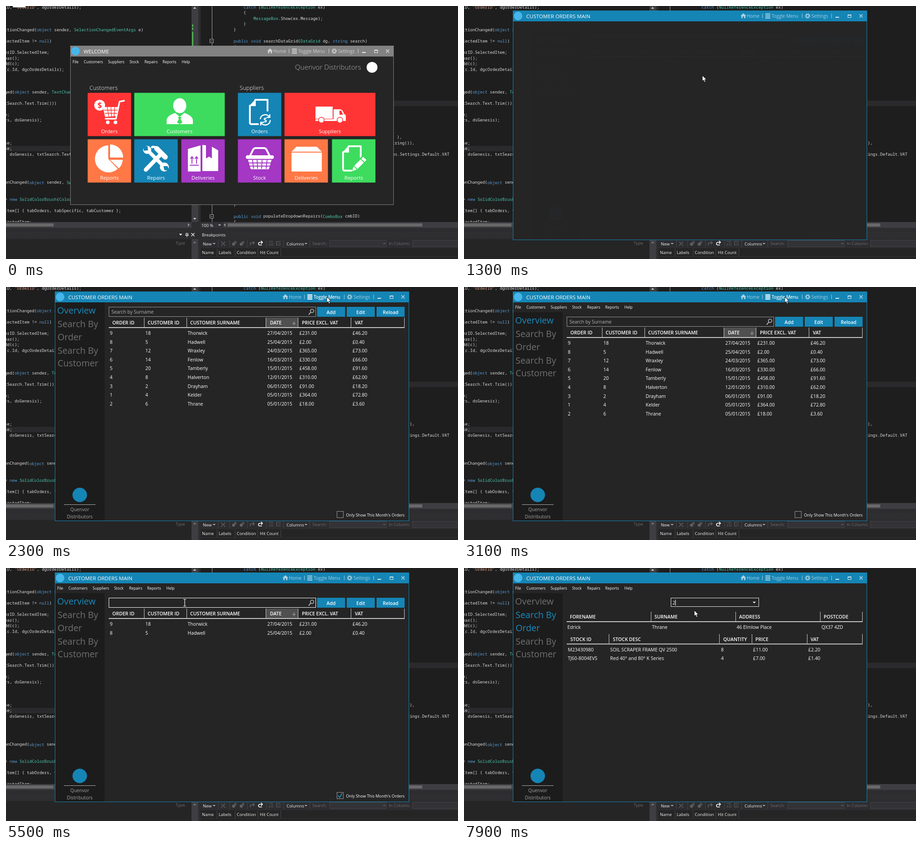
Recreate the animation shown at these times as an HTML page. Size 999 px wide and 561 px high, loop 8000 ms.

```html
<!DOCTYPE html>
<html lang="en">
<head>
<meta charset="utf-8">
<title>Customer orders</title>
<style>
html,body{margin:0;width:100%;height:100%;overflow:hidden;background:#1e1e1e}
svg{display:block;width:999px;height:561px}
text{font-family:"Open Sans","Noto Sans",sans-serif;font-size:10.4px;fill:#fff;dominant-baseline:central;white-space:pre}
.code{font-family:"Noto Sans Mono","DejaVu Sans Mono",monospace;font-size:9.13px;fill:#dcdcdc}
.kw{fill:#569cd6}.ty{fill:#4ec9b0}.st{fill:#d69d85}
.vs{font-size:9.4px;fill:#f1f1f1}
.off{fill:#6d6d70}
.menu{font-size:8.4px}
.title{font-size:11.6px}
.cmd{font-size:9.9px}
.tile{font-size:11.3px;text-anchor:middle}
.group{font-size:12.8px;font-weight:300}
.brand{font-size:15.4px;font-weight:300;fill:#b4b4b4;text-anchor:end}
.tab{font-size:19.7px;fill:#707070}
.tab.on{fill:#1a8bbd}.tab.hot{fill:#b8b8b8}
.head{font-size:10.5px;font-weight:600}
.btn{font-weight:600;text-anchor:middle}
.side{font-size:10.3px;fill:#a5a5a5;text-anchor:middle}
.hint{fill:#b4b4b4}
.note{font-size:8.9px;text-anchor:end}
.dim{fill:#949494}
.ln{fill:none;stroke:#fff;stroke-linecap:round;stroke-linejoin:round}
.step{animation-duration:8s;animation-iteration-count:infinite;animation-timing-function:step-end}
#active{animation-name:activate}
#slide{animation:slide 8s infinite linear}
#body{animation-name:lift}
#hover{animation-name:hover}
#cursor{animation:move 8s infinite linear}
@keyframes activate{0%{fill:#828282;stroke:#828282}11.25%,100%{fill:#1585b5;stroke:#1585b5}}
@keyframes slide{
  0%,16.25%{transform:translateX(40px);opacity:0;animation-timing-function:cubic-bezier(.165,.84,.44,1)}
  20%{opacity:1}
  22.5%,100%{transform:none;opacity:1}
}
@keyframes lift{
  0%,31.25%,38.75%,100%{transform:none}
  27.5%,35%{transform:translateY(-22px)}
}
@keyframes hover{
  0%,48.75%,58.75%,100%{opacity:0}
  45%{opacity:1;transform:translateY(39.2px)}
  46.25%{opacity:1;transform:translateY(98px)}
  47.5%{opacity:1;transform:translateY(176.4px)}
  56.25%{opacity:1;transform:translateY(39.2px)}
  57.5%{opacity:1;transform:none}
}
@keyframes move{
  0%{transform:translate(985px,566px);animation-timing-function:steps(9)}
  11.25%{transform:translate(232px,240px);animation-timing-function:steps(2)}
  13.75%{transform:translate(422px,218px);animation-timing-function:steps(5)}
  20%{transform:translate(684px,58px);animation-timing-function:steps(3)}
  23.75%,42.5%{transform:translate(709px,22px);animation-timing-function:steps(7)}
  51.25%,52.5%{transform:translate(738px,503px);animation-timing-function:steps(1)}
  53.75%{transform:translate(700px,488px);animation-timing-function:steps(2)}
  56.25%{transform:translate(462px,152px);animation-timing-function:steps(3)}
  60%,76.25%{transform:translate(395px,77px);animation-timing-function:steps(5)}
  82.5%,83.75%{transform:translate(198px,117px);animation-timing-function:steps(7)}
  92.5%,93.75%{transform:translate(505px,78px);animation-timing-function:steps(4)}
  98.75%,100%{transform:translate(509px,94px)}
}
</style>
</head>
<body>
<svg id="stage" viewBox="0 0 999 561"></svg>
<script>
const BLUE = '#1585b5', RED = '#ff3535', GREEN = '#3ddc5f', ORANGE = '#ff7846', PURPLE = '#a437c4';
const END = 8000, rules = [];

const text = (x, y, s, cls = '') => `<text x="${x}" y="${y}" class="${cls}">${s}</text>`;
const rect = (x, y, w, h, fill, more = '') => `<rect x="${x}" y="${y}" width="${w}" height="${h}" fill="${fill}" ${more}/>`;
const box = (x, y, w, h, stroke, fill = 'none') => rect(x + .5, y + .5, w - 1, h - 1, fill, `stroke="${stroke}"`);
const path = (d, fill = '#fff', more = '') => `<path d="${d}" fill="${fill}" ${more}/>`;
const line = (d, w = 1, color = '#fff') => `<path class="ln" d="${d}" stroke-width="${w}" style="stroke:${color}"/>`;
const dot = (x, y, r, fill = '#fff') => `<circle cx="${x}" cy="${y}" r="${r}" fill="${fill}"/>`;

// Shows its content only within the given [from, to] spans in ms.
function during(spans, body) {
  const name = 'show' + rules.length;
  const keys = spans.map(([a, b]) => `${a / 80}%{opacity:1}` + (b < END ? `${b / 80}%{opacity:0}` : ''));
  rules.push(`@keyframes ${name}{0%{opacity:0}${keys.join('')}}`);
  return `<g class="step" style="animation-name:${name}">${body}</g>`;
}

// ---- code editor behind the windows
const syntax = /("[^"]*")|\b(public|void|string|object|null|catch|new)\b|\b(NullReferenceException|SelectionChangedEventArgs|TextChangedEventArgs|MessageBox|DataGrid|ComboBox|SolidColorBrush|Colors)\b/g;
const code = (x, row, s, anchor = 'start') => `<text class="code" x="${x}" y="${2.3 + 12.53 * row}" text-anchor="${anchor}">` +
  s.replace(syntax, (m, str, kw) => `<tspan class="${str ? 'st' : kw ? 'kw' : 'ty'}">${m}</tspan>`) + '</text>';

const leftCode = {
  0: 'ID, "OrderID", dgOrderDetails);',
  4: 'ctionChanged(object sender, SelectionChangedEventArgs e)',
  6: 'lectedItem != null)',
  8: 'erID.SelectedItem;', 9: 'ear();', 10: 'dd(c);', 11: '(c.Id, dgcOrderDetails);',
  15: 'ged(object sender, TextChangedEventArgs e)',
  17: 'tSearch.Text.Trim()))',
  19: 'e;', 20: 'rs, dsGenesis);',
  24: 'se;', 25: 'se;', 26: ', dsGenesis, txtSearch.Text.Trim());',
  31: 'onChanged(object sender, SelectionChangedEventArgs e)',
  34: '= new SolidColorBrush(Colors.White);',
  36: 'Item[] { tabOrders, tabSpecific, tabCustomer };',
  38: 'lectedItem;'
};
const rightCode = [
  [525, 0, 'catch (NullReferenceException ex)'], [525, 1, '{'], [547, 2, 'MessageBox.Show(ex.Message);'],
  [525, 3, '}'], [503, 4, '}'], [503, 6, 'public void searchDataGrid(DataGrid dg, string search)'], [503, 7, '{'],
  [503, 35, '}'], [503, 37, 'public void populateDropdownRepairs(ComboBox cmbID)'], [503, 38, '{']
];
const arrow = (x, y, d = 1, color = '#c8c8c8') => path(`M${x - 3.5} ${y - 2 * d}h7l-3.5 ${4 * d}z`, color);
const sideArrow = (x, y, d) => path(`M${x - 2 * d} ${y - 3.5}v7l${4 * d} -3.5z`, '#999');
const fold = y => box(450, y - 4, 9, 9, '#a5a5a5', '#1e1e1e') + line(`M452.5 ${y + .5}h4`, 1, '#a5a5a5');

function editor() {
  const dots = (x, w) => [503, 507, 511].map(y => `<path d="M${x} ${y}h${w}" stroke="#46464a" stroke-dasharray="1 3"/>`).join('');
  return rect(0, 0, 999, 561, '#1e1e1e') +
    rect(0, 310, 410, 12, '#2a2a2c') + rect(458, 210, 541, 12, '#2a2a2c') +
    Object.entries(leftCode).map(([row, s]) => code(-3, +row, s)).join('') +
    rightCode.map(c => code(...c)).join('') +
    code(875, 23, '),', 'end') + code(903, 24, '.ToString()),', 'end') + code(980, 26, 'Properties.Settings.Default.VAT', 'end') +
    rect(455, 0, 1, 479, '#a5a5a5') + fold(77) + fold(466) +
    rect(410, 0, 15, 479, '#3e3e42') + rect(411, 41, 3, 5, '#4caf50') + rect(411, 48, 3, 5, '#4caf50') + rect(411, 57, 3, 34, '#4caf50') +
    arrow(417, 4, -1) + arrow(417, 472) +
    rect(425, 0, 5, 561, '#2d2d30') +
    rect(0, 479, 999, 82, '#2d2d30') + rect(0, 479, 410, 13, '#3e3e42') + rect(0, 482, 105, 7, '#686868') + sideArrow(404, 485.5, 1) +
    rect(480, 479, 519, 13, '#3e3e42') + rect(490, 482, 430, 7, '#686868') + sideArrow(483, 485.5, -1) +
    rect(430, 479, 48, 13, '#333337') + text(432, 486, '100 %', 'vs') + arrow(472, 486, .7) +
    dots(0, 378) + dots(491, 508) + arrow(386, 507, 1, '#f1f1f1') +
    line('M398 504h4v4h-4zM396.5 508.5h7M400 509v3', 1.2) + line('M410 504l6 6M416 504l-6 6', 1.4) +
    rect(0, 517, 410, 44, '#252526') + rect(410, 517, 15, 44, '#3e3e42') + arrow(417, 524, -1, '#77777a') + text(375, 525, 'Type', 'vs off') +
    text(433, 507.5, 'Breakpoints', 'vs') +
    text(435, 527, 'New', 'vs') + arrow(460, 527, .6) +
    line('M476 523l8 8M484 523l-8 8', 1.4, '#656568') +
    [503, 520].map(x => dot(x, 528, 3.5, '#606063') + dot(x + 4, 524, 3, '#505053')).join('') +
    line('M540 530v-3q0-2 2-2h7M546 522l3 3-3 3', 1.6, '#656568') + line('M565 530h-4q-3 0-3-3t3-3h5M564 521l3 3-3 3', 1.6) +
    line('M581 522h9M585 526h6M585 530h6M582 527v4', 1.2, '#656568') + line('M598 522h9M602 526h5M598 530h9M598 522v8', 1.2, '#656568') +
    [469, 494, 533, 575, 613, 671].map(x => rect(x, 519, 1, 16, '#46464a')).join('') +
    text(620, 527, 'Columns', 'vs') + arrow(663, 527, .6) +
    text(677, 526.5, 'Search:', 'vs off') + box(715, 519, 126, 15, '#434346', '#333337') + arrow(836, 527, .5, '#6d6d70') +
    text(846, 526.5, 'In Column:', 'vs off') + box(898, 519, 120, 15, '#434346', '#333337') +
    rect(430, 537, 569, 24, '#252526') + rect(430, 555, 569, 1, '#333337') +
    [[433, 'Name'], [470, 'Labels'], [510, 'Condition'], [561, 'Hit Count']].map(([x, s]) => text(x, 546, s, 'vs')).join('') +
    [466, 506, 556, 607].map(x => rect(x, 538, 1, 17, '#46464a')).join('');
}

// ---- window chrome
const bars = (x, y) => [0, 3.2, 6.4, 9.6].map(d => rect(x, y + d, 11, 1.8, '#fff')).join('');
function commands(r, y) {
  const sep = [232, 144, 79].map(d => rect(r - d, y - 5, 1, 10, '#fff')).join('');
  return `<g opacity=".62">${path(`M${r - 280} ${y}l6.5 -6 6.5 6h-2v5h-3v-4h-3v4h-3v-5z`)}${text(r - 266, y, 'Home', 'cmd')}` +
    bars(r - 225, y - 5.5) + text(r - 211, y, 'Toggle Menu', 'cmd') + sep +
    `<circle cx="${r - 131.5}" cy="${y}" r="3.2" class="ln" stroke-width="1.8"/><circle cx="${r - 131.5}" cy="${y}" r="5" class="ln" style="stroke-linecap:butt" stroke-width="1.8" stroke-dasharray="2 1.93"/>` +
    text(r - 123, y, 'Settings', 'cmd') + '</g>' +
    `<g opacity=".85">${rect(r - 70, y + 2, 8, 2, '#fff')}${box(r - 43, y - 3, 8, 7, '#fff')}${rect(r - 43, y - 3, 8, 2, '#fff')}${line(`M${r - 16.5} ${y - 3}l6 6m0-6l-6 6`, 1.2)}</g>`;
}
const chrome = (x, y, w, h, title, id) =>
  `<g ${id ? `id="${id}" class="step"` : `fill="${BLUE}" stroke="${BLUE}"`}><rect x="${x + .5}" y="${y + .5}" width="${w - 1}" height="${h - 1}"/></g>` +
  rect(x + 1, y + 24, w - 2, h - 25, '#252525') + dot(x + 11.5, y + 12, 9.5, '#46b6ea') +
  text(x + 29.5, y + 12, title, 'title') + commands(x + w, y + 12);
const menu = (x, y) => [[5, 'File'], [30, 'Customers'], [83.5, 'Suppliers'], [131, 'Stock'], [164, 'Repairs'], [204, 'Reports'], [246.5, 'Help']]
  .map(([dx, s]) => text(x + dx, y, s, 'menu')).join('');

// ---- welcome tiles
const sheet = (x, y) => line(`M${x + 14} ${y + 2}h27v24M${x + 2} ${y + 15}v37q0 4 4 4h14`, 4) + path(`M${x} ${y + 16}L${x + 15} ${y}v16z`);
const icons = {
  cart: dot(207, 220, 12) + `<text x="207" y="220" text-anchor="middle" style="font-size:17px;font-weight:700;fill:${RED}">$</text>` +
    line('M261 210L251 212 243 250H220', 3.5) + path('M214 224h34l-5 20-24 2z') +
    line('M224 225l3 19M232 225l1 19M240 225l-1 19M217 231h29M219 238h26', 1.5, RED) + dot(225, 258, 4) + dot(242, 258, 4),
  person: `<ellipse cx="384" cy="221" rx="14.5" ry="16.5" fill="#fff"/>` +
    path('M355 262V253Q356 243 374 237L384 246 394 237Q412 243 413 253V262z') + path('M380 246h8l-2 5 4 7-6 4-6-4 4-7z', GREEN),
  pie: path('M226 339V309A30 30 0 1 0 247 361z') + path('M230 341H258A30 30 0 0 1 249.5 360z') + path('M230 336V307A29 29 0 0 1 259 336z'),
  tools: line('M315 322L350 357', 8) + line('M309 363L339 332', 9) + dot(312, 319, 9) + dot(350, 357, 10) +
    path('M302 310l11 1 1 9-9 1zM361 365l-11-1-2-9 9 0z', BLUE) + line('M333 316L352 335', 11) + line('M331 314q-5-3-8-1', 5),
  parcel: path('M402 317L430 309V367H402z') + path('M434 308L442 309V338L449 334 455 338V312L469 320V366H434z') +
    line('M411 349V335M408 338l3-4 3 4M421 349V335M418 338l3-4 3 4M407 353h18', 2, PURPLE),
  invoice: sheet(537, 206) + dot(573, 252, 14, BLUE) +
    line('M562 250a11 11 0 0 1 20-4m1-5v6h-6M584 254a11 11 0 0 1-20 5m-1 5v-6h6', 2.5) +
    '<text x="573" y="252" text-anchor="middle" style="font-size:14px;font-weight:700">$</text>',
  truck: rect(684, 223, 38, 27, '#fff') + path('M724 229H738Q744 229 747 239L751 242V255H684V251H724z') + path('M737 232h4l4 9h-8z', RED) +
    [697, 738].map(x => dot(x, 253, 7, RED) + dot(x, 253, 5.5)).join(''),
  basket: line('M538 335L546 319Q548 315 552 315H570Q574 315 576 319L584 335', 4) + rect(530, 331, 62, 8, '#fff', 'rx="4"') +
    path('M535 341H587L581 362H541z') + line('M545 342l2 18M555 342l1 18M566 342l-1 18M577 342l-2 18M537 348h48M539 355h44', 2, PURPLE),
  carton: path('M631 323L642 312H687L698 323z') + rect(631, 325, 67, 42, '#fff'),
  report: sheet(743, 309) + `<g transform="rotate(45 781 350)">${rect(773, 330, 16, 40, GREEN)}${rect(776, 333, 10, 6, '#fff')}${rect(776, 341, 10, 20, '#fff')}${path('M776 363h10l-5 10z')}</g>`
};
const tile = (x, y, w, color, label, icon) => rect(x - .5, y - .5, w + 1, 96, color) + icons[icon] + text(x + w / 2, y + 84, label, 'tile');

function welcome() {
  return chrome(142, 88, 715, 353, 'WELCOME', 'active') + menu(142, 123) +
    text(785, 135, 'Quenvor Distributors', 'brand') + dot(809, 136, 12) +
    text(184.5, 180.5, 'Customers', 'group') + text(516.5, 180.5, 'Suppliers', 'group') +
    tile(181, 193, 95, RED, 'Orders', 'cart') + tile(284, 193, 199, GREEN, 'Customers', 'person') +
    tile(181, 296, 95, ORANGE, 'Reports', 'pie') + tile(284, 296, 95, BLUE, 'Repairs', 'tools') + tile(388, 296, 95, PURPLE, 'Deliveries', 'parcel') +
    tile(513, 193, 95, BLUE, 'Orders', 'invoice') + tile(616, 193, 200, RED, 'Suppliers', 'truck') +
    tile(513, 296, 95, PURPLE, 'Stock', 'basket') + tile(616, 296, 95, ORANGE, 'Deliveries', 'carton') + tile(721, 296, 95, GREEN, 'Reports', 'report');
}

// ---- orders window
const orders = [
  '9|18|Thorwick|27/04/2015|£231.00|£46.20', '8|5|Hadwell|25/04/2015|£2.00|£0.40', '7|12|Wraxley|24/03/2015|£365.00|£73.00',
  '6|14|Fenlow|16/03/2015|£330.00|£66.00', '5|20|Tamberly|15/01/2015|£458.00|£91.60', '4|8|Halverton|12/01/2015|£310.00|£62.00',
  '3|2|Drayham|06/01/2015|£91.00|£18.20', '1|4|Kelder|05/01/2015|£364.00|£72.80', '2|6|Thrane|05/01/2015|£18.00|£3.60'
].map(s => s.split('|'));
const table = (rows, xs, y) => rows.map((r, i) => r.map((s, c) => text(xs[c], y + 19.6 * i, s)).join('')).join('');
const grid = rows => table(rows, [229.5, 308, 401.5, 577.5, 648.5, 766], 124);
const header = (y, cols, seps) => cols.map(([x, s]) => text(x, y, s, 'head')).join('') +
  seps.map(x => rect(x, y - 11, 1, 21, '#d0d0d0')).join('') + rect(227, y + 10, 654, 2, '#c8c8c8');
const tab = (x, y, words, cls = '') => words.map((s, i) => text(x, y + 28.5 * i, s, 'tab ' + cls)).join('');
const button = (x, s) => rect(x, 66, 62, 22, BLUE) + text(x + 31, 77.5, s, 'btn');
const caret = (x, y) => rect(x, y, 1, 13, '#fff');

function overview() {
  return box(227, 66, 458, 22, '#9a9a9a') +
    during([[0, 5000]], text(233, 77, 'Search by Surname', 'hint')) +
    during([[5000, END]], box(227, 66, 458, 22, '#fff')) +
    during([[5000, 5500]], caret(232, 70)) + during([[5700, END]], text(232, 77, 'a')) + during([[5700, 6200]], caret(238.5, 70)) +
    '<circle cx="676.5" cy="75" r="3.8" class="ln" stroke-width="1.5" style="stroke:#bbb"/>' + line('M673.5 78l-4 5', 2, '#bbb') +
    button(687.5, 'Add') + button(753, 'Edit') + button(819, 'Reload') +
    rect(575, 90, 70, 21, '#505050') +
    header(101, [[235, 'ORDER ID'], [313, 'CUSTOMER ID'], [407, 'CUSTOMER SURNAME'], [583.5, 'DATE'], [654, 'PRICE EXCL. VAT'], [771, 'VAT']],
      [305, 399, 574, 645, 762, 880]) +
    line('M636.5 98v7m-3-3l3 3 3-3', 1.2, '#999') +
    `<g id="hover" class="step">${rect(227, 114, 654, 19.6, '#1d546c')}</g>` +
    during([[0, 4300]], grid(orders)) +
    during([[4300, 5800]], grid(orders.filter(o => o[3].includes('/04/')))) +
    during([[5800, END]], grid(orders.filter(o => o[2].includes('a'))));
}

function monthFilter() {
  const label = cls => text(881, 505, "Only Show This Month's Orders", 'note ' + cls);
  return during([[0, 5800]], box(731, 497, 15, 15, '#9a9a9a') + label('')) +
    during([[4200, 5000]], box(731, 497, 15, 15, BLUE)) +
    during([[4200, 5800]], line('M734 505l3.5 4 5-9', 1.6, '#1f9ad0')) +
    during([[5800, END]], box(731, 497, 15, 15, '#8a8a8a', '#6c6c6c') + label('dim'));
}

function byOrder() {
  return box(457, 66, 195, 20, '#e8e8e8') + arrow(641.5, 76.5, .9, '#fff') +
    during([[7600, END]], text(461, 76.5, '2')) + during([[7400, 7600]], caret(461, 70)) + during([[7600, END]], caret(467, 70)) +
    header(108, [[234, 'FORENAME'], [421, 'SURNAME'], [608, 'ADDRESS'], [795, 'POSTCODE']], [413, 600, 787, 880]) +
    header(157.5, [[235, 'STOCK ID'], [329, 'STOCK DESC'], [573, 'QUANTITY'], [644, 'PRICE'], [766, 'VAT']], [320, 564, 636, 758, 880]) +
    during([[7700, END]], table([['Edrick', 'Thrane', '46 Elmlow Place', 'QX37 4ZD']], [228.5, 415.5, 602.5, 790], 131) +
      table([['M23430980', 'SOIL SCRAPER FRAME QV 2500', '8', '£11.00', '£2.20'], ['TJ60-8004EVS', 'Red 40° and 80° K Series', '4', '£7.00', '£1.40']],
        [229.5, 323, 568, 639, 761], 180.5));
}

function ordersWindow() {
  const first = cls => tab(113, 73, ['Overview'], cls), second = cls => tab(114, 103.5, ['Search By', 'Order'], cls);
  const tabs = during([[0, 6800]], first('on')) + during([[6800, END]], first('')) +
    during([[0, 6600]], second('')) + during([[6600, 6800]], second('hot')) + during([[6800, END]], second('on')) +
    tab(114, 162, ['Search By', 'Customer']);
  return chrome(108, 10, 783, 509, 'CUSTOMER ORDERS MAIN') +
    during([[1900, 3500]], bars(666, 16.5) + text(680, 22, 'Toggle Menu', 'cmd')) +
    '<g clip-path="url(#pane)"><g id="slide">' +
    during([[0, 2200], [2500, 2800], [3100, END]], menu(108, 44.5)) +
    rect(109, 86, 109, 433, '#1c1c1c') +
    `<g id="body" class="step">${rect(109, 56, 109, 60, '#1c1c1c')}${tabs}${during([[0, 6800]], overview())}${during([[6800, END]], byOrder())}</g>` +
    dot(163, 461, 16, BLUE) + rect(128, 482, 70, 1, '#b0b0b0') + text(163, 493, 'Quenvor', 'side') + text(163, 508.5, 'Distributors', 'side') +
    during([[0, 6800]], monthFilter()) + '</g></g>';
}

const pointer = '<g id="cursor">' +
  during([[0, 4800], [6200, END]], path('M0 0V12.5L3 10 5 15 7.3 14 5.2 9.2H9z', '#fff', 'stroke="#000" stroke-width=".8"')) +
  during([[4800, 6200]], line('M-2.5 -7.5H2.5M0 -7.5V7.5M-2.5 7.5H2.5', 1.2)) + '</g>';

const scene = '<clipPath id="pane"><rect x="109" y="34" width="781" height="484"/></clipPath>' + editor() +
  during([[0, 100]], rect(15, 0, 28, 3, '#fff')) + during([[0, 1300]], welcome()) + during([[1300, END]], ordersWindow()) + pointer;

const sheetEl = document.createElement('style');
sheetEl.textContent = rules.join('\n');
document.head.append(sheetEl);
document.getElementById('stage').innerHTML = scene;
</script>
</body>
</html>
```
